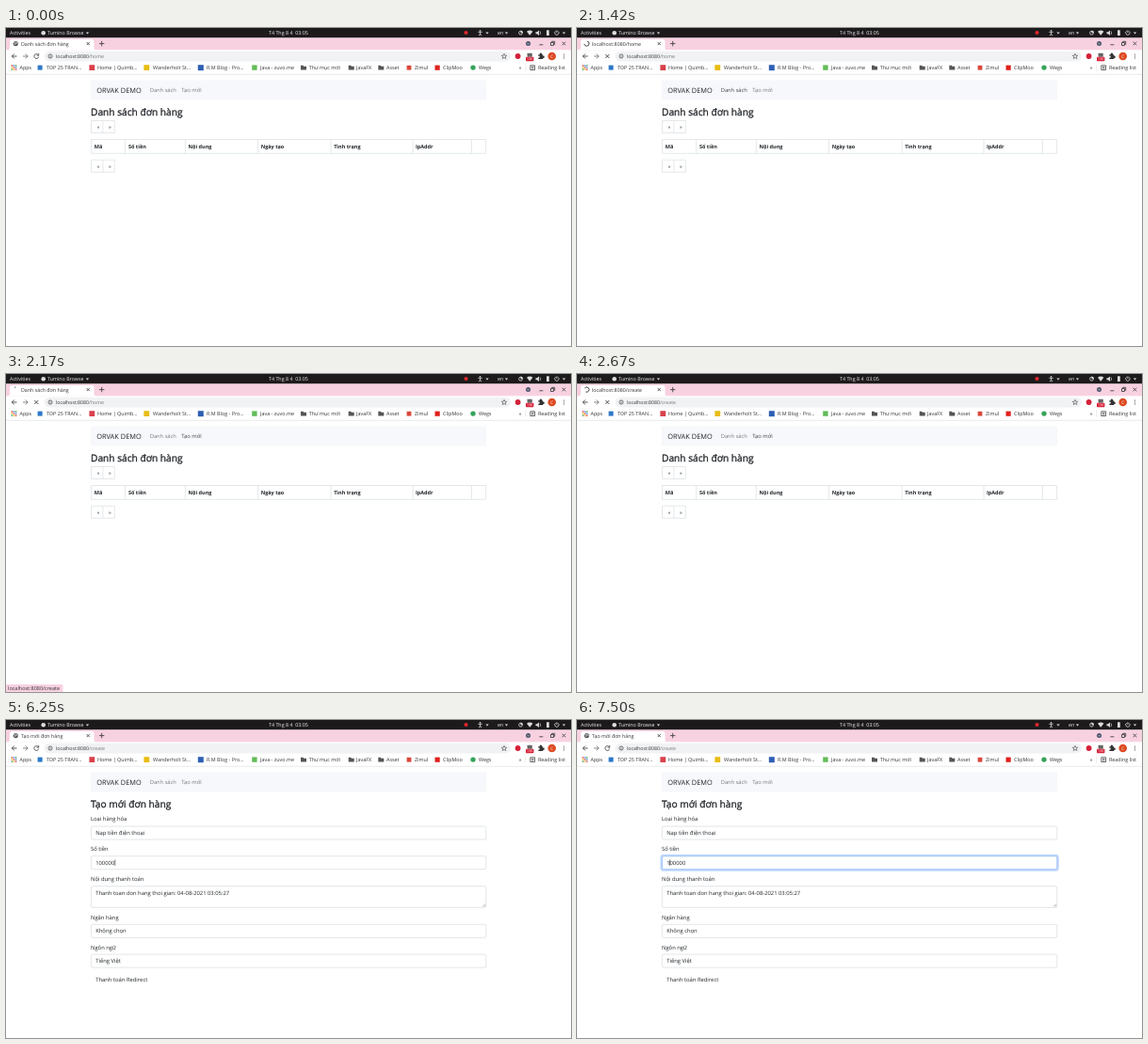
Recreate the animation shown at these times as an HTML page. Size 600x338 px, loop 8 s.

```html
<!DOCTYPE html>
<html lang="vi">
<head>
<meta charset="utf-8">
<title>Danh sách đơn hàng</title>
<style>
  html, body { margin: 0; width: 100%; height: 100%; overflow: hidden; background: #fff; }
  svg { display: block; width: 100%; height: 100%; }
  text { font: 5.4px "Open Sans", "Noto Sans", sans-serif; fill: #333; white-space: pre; text-rendering: geometricPrecision; }
  .bar text { fill: #eee; font-size: 5.35px; }
  .page text { font-size: 5.85px; fill: #212529; }
  .page .brand { font-size: 7.4px; }
  .page .title { font-size: 10.2px; stroke: #212529; stroke-width: .3px; }
  .page .head text { font-size: 5.5px; font-weight: 700; }
  .page .arrow { fill: #0d7bfd; text-anchor: middle; }
  .line { fill: none; stroke: #dee2e6; stroke-width: .8; }
  .field { fill: #fff; stroke: #ced4da; stroke-width: .6; }
  .icon { fill: none; stroke: #444; stroke-width: .9; }
</style>
</head>
<body>
<svg viewBox="0 0 600 338" preserveAspectRatio="none">
  <defs>
    <path id="down" d="M-1.7 -.8H1.7L0 1.3Z"/>
    <path id="folder" d="M-3 -2.4H-.6L.3 -1.5H3V2.4H-3Z" fill="#555"/>
    <g id="pager">
      <path class="line" d="M.5 .5H25.3V13.5H.5ZM12.9 .5V13.5"/>
      <text class="arrow" x="6.7" y="9">«</text>
      <text class="arrow" x="19.1" y="9">»</text>
    </g>
  </defs>

  <!-- desktop bar -->
  <g class="bar" fill="#ddd">
    <rect width="600" height="10.5" fill="#1d1a1c"/>
    <text x="4" y="7.2">Activities</text>
    <circle cx="39.7" cy="5.2" r="2.3"/>
    <text x="44" y="7.2">Tumino Browse</text>
    <use href="#down" x="86.5" y="5.2"/>
    <text x="279" y="7.2">T4 Thg 8 4  03:05</text>
    <circle cx="488.5" cy="5" r="2.1" fill="#e0282e"/>
    <circle cx="503.5" cy="2.9" r=".8"/>
    <path d="M501.3 4.3H505.7M503.5 4.2V6L502.3 8.3M503.5 6L504.7 8.3" fill="none" stroke="#ddd" stroke-width=".8"/>
    <use href="#down" x="511" y="5.2"/>
    <text x="522" y="7.2">en</text>
    <use href="#down" x="531.5" y="5.2"/>
    <circle cx="546.5" cy="5.2" r="1.9" fill="none" stroke="#ddd" stroke-width=".8"/>
    <path d="M546.5 5.2V2.5A2.7 2.7 0 0 1 549 5.2Z"/>
    <path d="M553 3.7Q556.2 1.4 559.4 3.7L556.2 7.7Z"/>
    <path d="M562.5 4.2H564L566 2.5V8L564 6.3H562.5Z"/>
    <path d="M567 3.4Q568.4 5.2 567 7" fill="none" stroke="#ddd" stroke-width=".7"/>
    <path d="M574 2.3H576.8V8H574Z"/>
    <use href="#down" x="592.5" y="5.2"/>
    <path d="M583.6 3.3A2.2 2.2 0 1 0 586.2 3.3M584.9 2.3V5" fill="none" stroke="#ddd" stroke-width=".8"/>
  </g>

  <!-- tab strip -->
  <rect y="10.5" width="600" height="12.8" fill="#f8d1e1"/>
  <path d="M1 23.4Q4 23.4 4 20.4V14.5Q4 12 6.5 12H91Q93.5 12 93.5 14.5V20.4Q93.5 23.4 96.5 23.4Z" fill="#fff"/>
  <g id="globe">
    <circle cx="10.3" cy="16.6" r="2.6" fill="#555"/>
    <path d="M8.4 15.4L10 16.3L9.6 17.8M10.6 14.6L11 15.8L12.4 16.4" fill="none" stroke="#fff" stroke-width=".8"/>
  </g>
  <circle id="spinner" class="icon" cx="10.3" cy="16.6" r="2.6" pathLength="100"/>
  <text id="tab" x="16" y="18.5" style="font-size:5.3px"></text>
  <path class="icon" d="M85.7 15.1L88.7 18.1M88.7 15.1L85.7 18.1M99 16.6H104.4M101.7 13.9V19.3"/>
  <circle cx="554.5" cy="16.5" r="2.5" fill="#4b5468"/>
  <path d="M553.3 16L554.5 17.2L555.7 16" fill="none" stroke="#fff" stroke-width=".6"/>
  <path class="icon" d="M566.3 17.8H570.3M578.5 15.5H581.5V18.5H578.5ZM579.6 15.4V14.3H582.7V17.4H581.6M590.6 14.7L594.2 18.3M594.2 14.7L590.6 18.3"/>

  <!-- toolbar -->
  <rect x="40.5" y="24.8" width="495.5" height="10.6" rx="5.3" fill="#f0f2f4"/>
  <path class="icon" d="M11.5 30H6.3M8.8 27.5L6.3 30L8.8 32.5"/>
  <path class="icon" style="stroke:#777" d="M18 30H23.2M20.7 27.5L23.2 30L20.7 32.5"/>
  <path id="reload" class="icon" d="M34.2 28.6A2.4 2.4 0 1 0 34.6 30.7M34.7 27.2V29.2H32.7"/>
  <path id="stop" class="icon" d="M30.3 28L34.3 32M34.3 28L30.3 32"/>
  <circle class="icon" cx="47" cy="30" r="2.1" style="stroke-width:.7"/>
  <path class="icon" d="M47 29.6V31.3M47 28.5V29.1" style="stroke-width:.7"/>
  <text x="53" y="32" style="font-size:5.2px">localhost:8080<tspan id="path" fill="#777"></tspan></text>
  <path class="icon" style="stroke-width:.6" d="M529 27.3L529.8 29.2L531.8 29.3L530.2 30.6L530.8 32.5L529 31.4L527.2 32.5L527.8 30.6L526.2 29.3L528.2 29.2Z"/>
  <circle cx="543.6" cy="30" r="2.9" fill="#d5203a"/>
  <rect x="553.6" y="26.7" width="5.2" height="4" rx=".6" fill="#666"/>
  <rect x="552" y="30.8" width="8.4" height="4.4" rx=".8" fill="#d8233a"/>
  <text x="556.2" y="34.4" text-anchor="middle" style="font-size:3.6px;fill:#fff">136</text>
  <path d="M565.3 28.3H566.8A1.2 1.2 0 1 1 569 28.3H570.2V29.7A1.1 1.1 0 1 1 570.2 31.7V33H565.3V31.5A1 1 0 1 0 565.3 29.7Z" fill="#333"/>
  <circle cx="579.7" cy="30" r="4.3" fill="#dd4a22"/>
  <text x="579.7" y="31.7" text-anchor="middle" style="font-size:4.6px;fill:#fff">C</text>
  <g fill="#444"><circle cx="592.5" cy="28" r=".6"/><circle cx="592.5" cy="30" r=".6"/><circle cx="592.5" cy="32" r=".6"/></g>

  <!-- bookmarks -->
  <g id="apps"></g>
  <text x="14.5" y="44.2">Apps</text>
  <rect x="33.6" y="39.6" width="5" height="5" fill="#2c78c8"/>
  <text x="43" y="44.2">TOP 25 TRAN...</text>
  <rect x="88.4" y="39.2" width="5.8" height="5.8" fill="#d9414b"/>
  <text x="97" y="44.2">Home | Quimb...</text>
  <rect x="146.4" y="39.2" width="5.8" height="5.8" fill="#e9bd13"/>
  <text x="156" y="44.2">Wanderholt St...</text>
  <rect x="203.8" y="39.2" width="6" height="6" fill="#2d5fb4"/>
  <text x="213" y="44.2">R.M Blog - Pro...</text>
  <rect x="261.2" y="39.4" width="5.4" height="5.4" fill="#63bd58"/>
  <text x="270" y="44.2">Java - zuvo.me</text>
  <use href="#folder" x="316" y="42.2"/>
  <text x="321.7" y="44.2">Thư mục mới</text>
  <use href="#folder" x="366.7" y="42.2"/>
  <text x="372" y="44.2">JavaFX</text>
  <use href="#folder" x="398.3" y="42.2"/>
  <text x="404" y="44.2">Asset</text>
  <rect x="425.6" y="39.8" width="4.8" height="4.8" fill="#d9473b"/>
  <text x="434" y="44.2">Zimul</text>
  <rect x="455.5" y="39.6" width="5.2" height="5.2" fill="#e0201c"/>
  <text x="464" y="44.2">ClipMoo</text>
  <circle cx="496" cy="42.1" r="2.7" fill="#35a35a"/>
  <text x="502" y="44.2">Wegs</text>
  <text x="544.7" y="44">»</text>
  <path d="M551.7 38.5V45.5" stroke="#ddd" stroke-width=".6"/>
  <path class="icon" d="M556.8 39.8H561.6V44.6H556.8ZM558 41.4H560.5M558 43H560.5" style="stroke-width:.8"/>
  <text x="565" y="44.2">Reading list</text>
  <path d="M0 49.3H600" stroke="#e1e2e4" stroke-width=".7"/>

  <!-- page -->
  <g class="page">
    <rect x="90" y="55.5" width="420" height="21" fill="#f7f8fb"/>
    <text class="brand" x="96.2" y="68.7">ORVAK DEMO</text>
    <text x="152.7" y="68.2" id="linkList" style="font-size:5.75px">Danh sách</text>
    <text x="186.2" y="68.2" id="linkNew">Tạo mới</text>

    <g id="list">
      <text class="title" x="90" y="92.5">Danh sách đơn hàng</text>
      <use href="#pager" x="90" y="98"/>
      <path class="line" d="M90.5 118.5H509.6V133.3H90.5ZM126.6 118.5V133.3M190.4 118.5V133.3M267.5 118.5V133.3M345 118.5V133.3M432 118.5V133.3M494.4 118.5V133.3"/>
      <g class="head">
        <text x="93.8" y="128">Mã</text>
        <text x="130" y="128">Số tiền</text>
        <text x="193.6" y="128">Nội dung</text>
        <text x="270.7" y="128">Ngày tạo</text>
        <text x="348.2" y="128">Tình trạng</text>
        <text x="435" y="128">IpAddr</text>
      </g>
      <use href="#pager" x="90" y="139.7"/>
    </g>

    <g id="form">
      <text class="title" x="90" y="92.5">Tạo mới đơn hàng</text>
      <text x="90" y="107.4">Loại hàng hóa</text>
      <rect class="field" x="90.4" y="113" width="419.4" height="14" rx="1.5"/>
      <text x="95.2" y="122.1">Nạp tiền điện thoại</text>
      <text x="90" y="139.4">Số tiền</text>
      <rect id="glow" x="89.4" y="143.7" width="421.4" height="16" rx="2.4" fill="none" stroke="#0d6efd" stroke-width="2"/>
      <rect class="field" x="90.4" y="144.7" width="419.4" height="14" rx="1.5"/>
      <rect id="ring" x="90.4" y="144.7" width="419.4" height="14" rx="1.5" fill="none" stroke="#86b7fe" stroke-width=".7"/>
      <text x="95.2" y="153.9">100000</text>
      <rect id="caret" y="148.5" width=".6" height="6.3" fill="#222"/>
      <text x="90" y="171.2">Nội dung thanh toán</text>
      <rect class="field" x="90.4" y="176.7" width="419.4" height="22.6" rx="1.5"/>
      <path d="M506 198.4L509 195.4M507.7 198.4L509 197.1" stroke="#777" stroke-width=".5"/>
      <text x="95.2" y="185.9">Thanh toan don hang thoi gian: 04-08-2021 03:05:27</text>
      <text x="90" y="211.9">Ngân hàng</text>
      <rect class="field" x="90.4" y="217.3" width="419.4" height="14" rx="1.5"/>
      <text x="95.2" y="226.4">Không chọn</text>
      <text x="90" y="243.7">Ngôn ngữ</text>
      <rect class="field" x="90.4" y="249.1" width="419.4" height="14" rx="1.5"/>
      <text x="95.2" y="258.2">Tiếng Việt</text>
      <text x="95.2" y="278.2">Thanh toán Redirect</text>
    </g>
  </g>

  <!-- link address bubble -->
  <g id="bubble">
    <path id="bubbleBox" fill="#f8d1e1"/>
    <text id="bubbleText" x="2" y="336" style="font-size:5.5px"></text>
  </g>
</svg>
<script>
const $ = id => document.getElementById(id);
const show = (id, on) => $(id).style.display = on ? '' : 'none';
const within = (n, from, to) => n >= from && n < to;
const LOOP = 8000, TICK = 1000 / 12;
const HOST = 'localhost:8080';

const dotColors = ['#e0483e', '#4a86e8', '#45a35a', '#f0b429'];
$('apps').innerHTML = Array.from({ length: 9 }, (_, i) =>
  `<rect x="${5.6 + i % 3 * 2.1}" y="${39.2 + Math.floor(i / 3) * 2.1}" width="1.5" height="1.5" fill="${dotColors[i % 4]}"/>`).join('');

// Loads in ticks: request, commit, finished
const loads = [
  { start: 10, commit: 15, end: 19, path: '/home' },
  { start: 26, commit: 31, end: 34, path: '/create' },
];

function linkColor(hover) {
  const v = Math.round(122 - 54 * hover);
  return `rgb(${v},${v},${v})`;
}

function drawLoading(n) {
  const load = loads.find(l => within(n, l.start, l.end));
  const committed = load && n >= load.commit;
  show('globe', !load);
  show('spinner', load);
  show('reload', !load);
  show('stop', load);
  if (load) {
    const k = n - load.start;
    const length = committed ? 70 : 7 + 9 * k;
    const angle = committed ? -80 + 60 * (n - load.commit - 2) : -115 - 45 * k;
    $('spinner').setAttribute('stroke-dasharray', `${length} ${100 - length}`);
    $('spinner').setAttribute('transform', `rotate(${angle} 10.3 16.6)`);
  }
  const title = n < loads[1].end ? 'Danh sách đơn hàng' : 'Tạo mới đơn hàng';
  $('tab').textContent = committed ? HOST + load.path : title;
  $('path').textContent = n < loads[1].commit ? '/home' : '/create';
}

function drawBubble(n) {
  const first = within(n, 8, loads[0].commit);
  show('bubble', first || within(n, 25, loads[1].commit));
  const width = first ? 59 : 60.5;
  $('bubbleBox').setAttribute('d', `M0 330H${width - 2}Q${width} 330 ${width} 332V338H0Z`);
  $('bubbleText').textContent = HOST + (first ? '/home' : '/create');
}

function drawForm(n) {
  const focus = Math.min(1, Math.max(0, (n - 75) / 2));
  $('glow').style.opacity = .25 * focus;
  $('ring').style.opacity = focus;
  show('caret', within(n, 75, 82) || n >= 89);
  $('caret').setAttribute('x', n < 90 ? 115.6 : 98.3);
}

function draw(time) {
  const n = Math.floor((time % LOOP + 4) / TICK);
  const created = n >= loads[1].end;
  drawLoading(n);
  drawBubble(n);
  drawForm(n);
  show('list', !created);
  show('form', created);
  $('linkList').style.fill = linkColor(within(n, 6, 19) ? 1 : 0);
  $('linkNew').style.fill = linkColor(created ? 0 : Math.min(1, Math.max(0, (n - 21) / 2)));
}

const begin = performance.now();
function loop() {
  draw(performance.now() - begin);
  requestAnimationFrame(loop);
}
loop();
</script>
</body>
</html>
```
